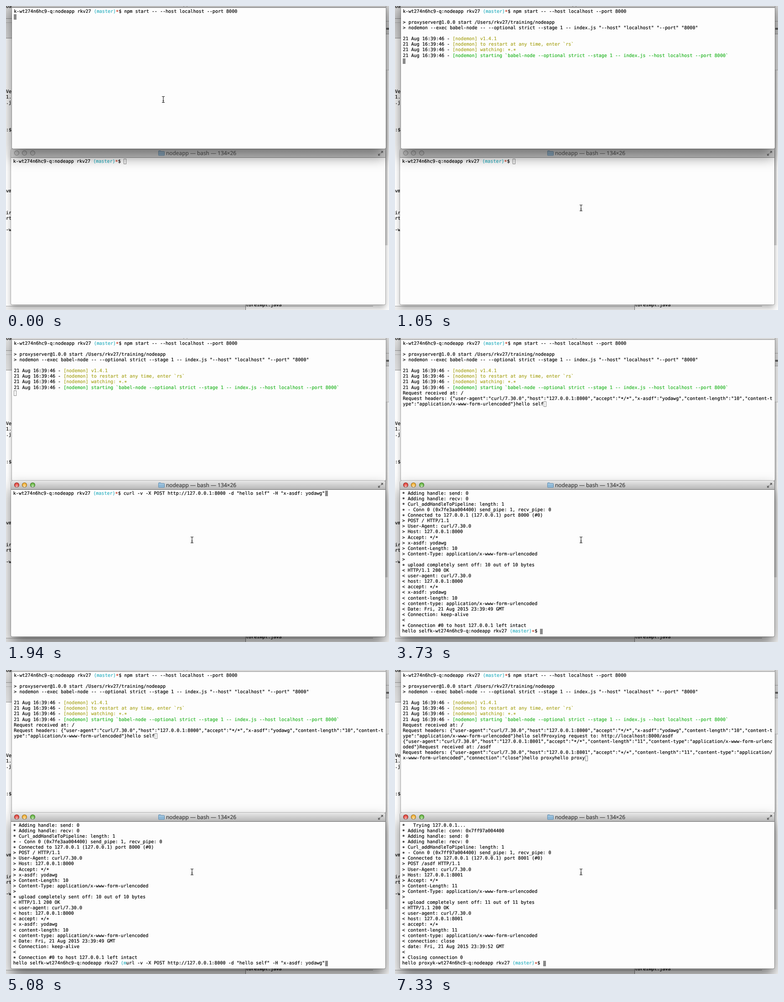
An HTML page that plays this animation: 840 by 667 pixels, repeating every 8000 ms.

```html
<!DOCTYPE html>
<html lang="en">
<head>
<meta charset="utf-8">
<title>Two terminals</title>
<style>
html, body { margin: 0; width: 100%; height: 100%; overflow: hidden; background: #fff; }
#stage { position: relative; width: 840px; height: 667px; overflow: hidden; background: #fff; }
#stage div, #stage pre, #stage svg, #stage b { position: absolute; margin: 0; }
pre, .scrap {
  font: 10.055px/12.1px "DejaVu Sans Mono", "Noto Sans Mono", monospace;
  color: #000; white-space: pre;
  text-rendering: geometricPrecision;
  -webkit-text-stroke: .2px;
}
pre i { font-style: normal; }
.c { color: #2fb0c0; }
.r { color: #c23a22; }
.y { color: #a9a51f; }
.g { color: #22b522; }
.star { position: relative; top: 1.5px; }

.win {
  background: #fdfdfd; border-radius: 5px 5px 3px 3px; z-index: 1;
  box-shadow: 0 0 0 1px rgba(0,0,0,.22), 0 7px 14px rgba(0,0,0,.32);
}
.win.on {
  z-index: 2;
  box-shadow: 0 0 0 1px rgba(0,0,0,.25), 0 16px 30px rgba(0,0,0,.55);
}
.bar {
  left: 0; right: 0; top: 0; height: 19px; border-radius: 5px 5px 0 0;
  background: linear-gradient(#efefef, #d6d6d6); border-bottom: 1px solid #8c8c8c;
}
.on .bar { background: linear-gradient(#e8e8e8, #b7b7b7); border-color: #6a6a6a; }
.name {
  left: 340px; top: 1px; white-space: pre; color: #606060;
  font: 11.95px/18px "Open Sans", "Noto Sans", sans-serif;
  text-rendering: geometricPrecision;
  -webkit-text-stroke: .2px;
}
.on .name { color: #333; }
.bar b {
  top: 4px; width: 9px; height: 9px; border-radius: 50%;
  border: 1px solid #8d8d8d; background: #d8d8d8;
}
.on .bar b {
  border-color: rgba(0,0,0,.4);
  background: radial-gradient(ellipse at 50% 95%, #fffb 0, #fff0 60%) border-box, var(--hue) border-box;
}
.bar svg { opacity: .8; }
.on .bar svg { opacity: 1; }
.caret { width: 6px; height: 12px; box-sizing: border-box; border: 1px solid #8a8a8a; }
.on .caret { background: #8a8a8a; }
#beam { z-index: 5; left: 0; top: 0; overflow: visible; }
</style>
</head>
<body>
<div id="stage">
  <svg id="beam" width="1" height="1" fill="none">
    <path id="halo" stroke="#fff" stroke-width="2.4" stroke-opacity=".8"/>
    <path id="ink" stroke="#111" stroke-width="1.1"/>
  </svg>
</div>
<script>
const LOOP = 8000, COL = 6.053, ROW = 12.1;
const stage = document.getElementById("stage");
const beam = document.getElementById("beam");

function add(parent, cls, css, html = "", tag = "div") {
  const el = document.createElement(tag);
  el.className = cls;
  el.style.cssText = css;
  el.innerHTML = html;
  parent.append(el);
  return el;
}

// Desktop behind the terminals: left, top, width, height, fill
[
  [0, 0, 14, 28, "linear-gradient(#e2e2e2, #cfcfcf)"],
  [0, 27, 14, 1, "#8b8b8b"],
  [0, 28, 14, 42, "linear-gradient(#d4d4d4, #dedede)"],
  [0, 36, 14, 1, "#b0b0b0"],
  [0, 70, 14, 1, "#8f8f8f"],
  [832, 0, 8, 61, "linear-gradient(#e0e0e0, #cccccc)"],
  [832, 33, 8, 1, "#a0a0a0"],
  [832, 61, 8, 1, "#999"],
  [832, 62, 8, 78, "#e9e9e9"],
  [832, 140, 8, 1, "#bbb"],
  [832, 141, 6, 384, "linear-gradient(90deg, #c4c4c4, #efefef)"],
  [0, 658, 525, 1, "#a5a5a5"],
  [0, 659, 525, 8, "#ececec"],
  [525, 655, 1, 12, "#777"],
  [526, 658, 279, 1, "#a5a5a5"]
].forEach(([x, y, w, h, fill]) =>
  add(stage, "", `left:${x}px;top:${y}px;width:${w}px;height:${h}px;background:${fill}`));

[
  ["oa", 0, 1], ["Ve", 0, 188], ["1.", 0, 200], [".j", 0, 212], [":$", 0, 272],
  ["vm", 0, 406], ["ir", 0, 454], ["rt", 0, 466], ["-w", 0, 491],
  ["toreImpl.java", 526, 656], ["∞", 834, 50]
].forEach(([s, x, y]) => add(stage, "scrap", `left:${x}px;top:${y - 5.3}px`, s));

const icons = `
  <svg style="left:323px;top:4px" width="14" height="12">
    <path d="M.5 10.5V1.5q0-1 1-1h3.5l1.5 1.5h6q1 0 1 1v7.5q0 .5-.5.5H1q-.5 0-.5-.5z" fill="#8db7d6" stroke="#6690b0"/>
    <path d="M1 4h12" stroke="#b9d7ea"/>
  </svg>
  <svg style="left:804px;top:4px" width="13" height="12" fill="#666" stroke="#666">
    <path d="M7 1h5v5zM1 6.500v5h5z" stroke="none"/>
    <path d="M7.500 5.500 11 2M5.500 7 2 10.500" stroke-width="1.8"/>
  </svg>`;
const lights = [["#e5483f", 7], ["#f2b035", 24], ["#68b944", 41.5]]
  .map(([hue, x]) => `<b style="left:${x}px;--hue:${hue}"></b>`).join("");

function terminal(x, y, w, h, pad, title) {
  const win = add(stage, "win", `left:${x}px;top:${y}px;width:${w}px;height:${h}px`);
  add(win, "bar", "", `${lights}${icons}<div class="name">${title}</div>`);
  const out = add(win, "", `left:${pad}px;top:22.8px`, "", "pre");
  const caret = add(win, "caret", "");
  return {
    focus: on => win.classList.toggle("on", on),
    show(text) {
      out.innerHTML = paint(text);
      const rows = text.split("\n"), last = rows.length - 1;
      caret.style.left = Math.round(pad + rows[last].length * COL) + "px";
      caret.style.top = Math.round(22 + last * ROW) + "px";
    }
  };
}

const tint = (cls, s) => `<i class="${cls}">${s}</i>`;
const paint = text => text.replace(/&/g, "&amp;").replace(/</g, "&lt;")
  .replace(/\(m(aster\))?/g, s => tint("c", s))
  .replace(/\*(?=\$)/g, s => tint("r", s))
  .replace(/\[nodemon\].*/g, s => tint(s.includes("starting") ? "g" : "y", s))
  .replace(/\*/g, s => tint("star", s));

const user = "rkv27";
const prompt = `k-wt274n6hc9-q:nodeapp ${user} (master)*$ `;
const cut = prompt.slice(0, 31);
const form = "application/x-www-form-urlencoded";
const curl = `curl -v -X POST http://127.0.0.1:8000 -d "hello self" -H "x-asdf: yodawg"`;
const proxyCurl = `curl -v http://127.0.0.1:8001/asdf -d "hello proxy"`;

// Server log, growing
const log0 = prompt + "npm start -- --host localhost --port 8000\n";
const log1 = log0 + `
> proxyserver@1.0.0 start /Users/${user}/training/nodeapp
> nodemon --exec babel-node -- --optional strict --stage 1 -- index.js "--host" "localhost" "--port" "8000"

`;
const log2 = log1 + [
  "v1.4.1", "to restart at any time, enter `rs`", "watching: *.*",
  "starting `babel-node --optional strict --stage 1 -- index.js --host localhost --port 8000`"
].map(s => `21 Aug 16:39:46 - [nodemon] ${s}\n`).join("");
const log3 = log2 + `Request received at: /
Request headers: {"user-agent":"curl/7.30.0","host":"127.0.0.1:8000","accept":"*/*","x-asdf":"yodawg","content-length":"10","content-t
ype":"${form}"}hello self`;
const head = `{"user-agent":"curl/7.30.0","host":"127.0.0.1:8001","accept":"*/*","content-length":"11","content-type":"application/`;
const log4 = log3 + `Proxying request to: http://localhost:8000/asdf
${head}x-www-form-urlenc
oded"}Request received at: /asdf
Request headers: ${head}
x-www-form-urlencoded","connection":"close"}hello proxyhello proxy`;

// Client replies
const reply1 = `* Adding handle: send: 0
* Adding handle: recv: 0
* Curl_addHandleToPipeline: length: 1
* - Conn 0 (0x7fe3aa004400) send_pipe: 1, recv_pipe: 0
* Connected to 127.0.0.1 (127.0.0.1) port 8000 (#0)
> POST / HTTP/1.1
> User-Agent: curl/7.30.0
> Host: 127.0.0.1:8000
> Accept: */*
> x-asdf: yodawg
> Content-Length: 10
> Content-Type: ${form}
>
* upload completely sent off: 10 out of 10 bytes
< HTTP/1.1 200 OK
< user-agent: curl/7.30.0
< host: 127.0.0.1:8000
< accept: */*
< x-asdf: yodawg
< content-length: 10
< content-type: ${form}
< Date: Fri, 21 Aug 2015 23:39:49 GMT
< Connection: keep-alive
<
* Connection #0 to host 127.0.0.1 left intact
hello self`;
const reply2 = `*   Trying 127.0.0.1...
* Adding handle: conn: 0x7ff97a004400
* Adding handle: send: 0
* Adding handle: recv: 0
* Curl_addHandleToPipeline: length: 1
* - Conn 0 (0x7ff97a004400) send_pipe: 1, recv_pipe: 0
* Connected to 127.0.0.1 (127.0.0.1) port 8001 (#0)
> POST /asdf HTTP/1.1
> User-Agent: curl/7.30.0
> Host: 127.0.0.1:8001
> Accept: */*
> Content-Length: 11
> Content-Type: ${form}
>
* upload completely sent off: 11 out of 11 bytes
< HTTP/1.1 200 OK
< user-agent: curl/7.30.0
< host: 127.0.0.1:8001
< accept: */*
< content-length: 11
< content-type: ${form}
< connection: close
< date: Fri, 21 Aug 2015 23:39:52 GMT
<
* Closing connection 0
hello proxy`;

const server = terminal(13, -16, 820, 329, 4.3, "nodeapp — node — 134×25");
const client = terminal(11, 313, 821, 342, 4.8, "nodeapp — bash — 134×26");

const shape = "M-3 -6.5h1.500q1.500 0 1.500 1.500V5q0 1.500-1.500 1.500H-3M3 -6.500H1.500Q0 -6.500 0 -5M0 5Q0 6.500 1.500 6.500H3M-1.500 2.500h3";
for (const id of ["halo", "ink"]) document.getElementById(id).setAttribute("d", shape);

const tracks = [
  [s => server.show(s), [[0, log0], [300, log1], [600, log2], [3730, log3], [7330, log4]]],
  [s => client.show(s), [
    [0, prompt], [1640, prompt + "clear"], [1940, prompt + curl],
    [3730, reply1 + prompt], [4330, reply1 + prompt + curl],
    [4630, reply1 + cut + "lear"], [5080, reply1 + cut + curl.slice(1)],
    [5830, reply1 + cut + "lear"], [6130, reply1 + cut + proxyCurl.slice(1)],
    [7330, reply2 + prompt]
  ]],
  [on => { client.focus(on); server.focus(!on); }, [[0, false], [1190, true]]],
  [([x, y]) => { beam.style.transform = `translate(${x}px,${y}px)`; }, [
    [0, [345, 205]], [450, [427, 357]], [600, [426, 413]],
    [750, [417, 436]], [900, [412, 450]], [1050, [408, 443]]
  ]]
].map(([apply, steps]) => ({ apply, steps, at: -1 }));

function render(t) {
  for (const tr of tracks) {
    let i = tr.steps.length - 1;
    while (tr.steps[i][0] > t) i--;
    if (i !== tr.at) tr.apply(tr.steps[tr.at = i][1]);
  }
}

const start = performance.now();
function tick() {
  render((performance.now() - start) % LOOP);
  requestAnimationFrame(tick);
}
tick();
</script>
</body>
</html>
```
